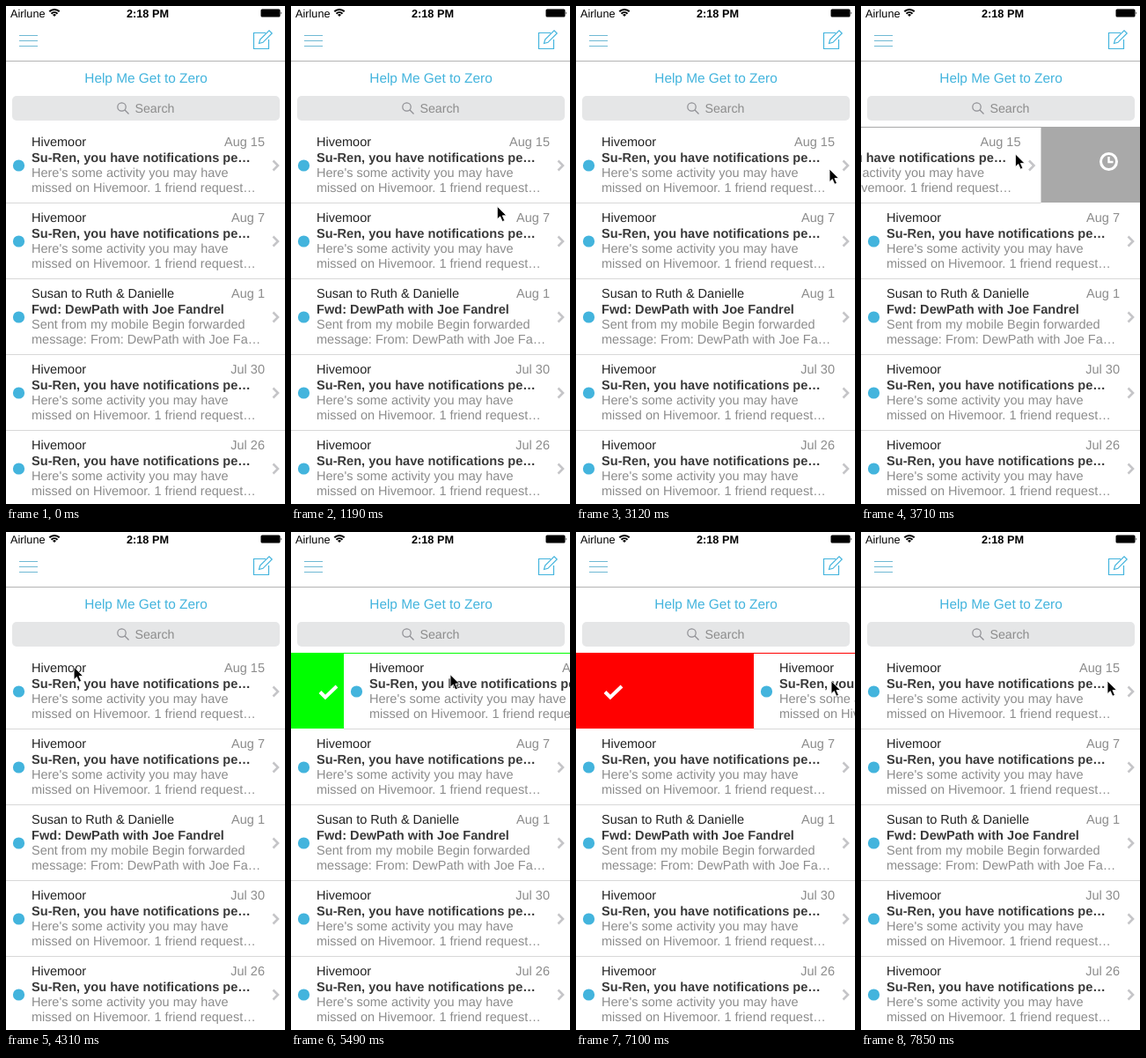
Write an HTML page that moves like this. It is 317 px wide and 565 px high and loops after 8000 ms.

```html
<!DOCTYPE html>
<html lang="en">
<head>
<meta charset="utf-8">
<title>Inbox swipe</title>
<style>
  html, body { margin: 0; width: 100%; height: 100%; overflow: hidden; background: #fff; }
  svg { display: block; width: 317px; height: 565px; }
  text { font: 14.5px "Liberation Sans", Arial, sans-serif; fill: #8c8c8c; text-rendering: geometricPrecision; }
  .status { font-size: 12.7px; fill: #000; }
  .strong { font-weight: bold; }
  .sender { fill: #222; }
  .subject { font-size: 14.6px; font-weight: bold; fill: #3a3a3a; }
  .blue { fill: #43b4dd; }
  .line { fill: none; }
</style>
</head>
<body>
<svg viewBox="0 0 317 565">
  <rect width="317" height="565" fill="#fff"/>

  <!-- status bar -->
  <text class="status" x="5" y="12.5">Airlune</text>
  <path class="line" d="M49.3 6.3a8 8 0 0 1 11.4 0M51.5 8.7a5 5 0 0 1 7 0" stroke="#000" stroke-width="2"/>
  <path d="M55 12l-2-2a3 3 0 0 1 4 0z"/>
  <text class="status strong" x="161" y="12.5" text-anchor="middle">2:18 PM</text>
  <rect x="289.5" y="3.5" width="22" height="9" rx="1.5"/>
  <path d="M312.5 6.2q1.6 1.8 0 3.6z"/>

  <!-- navigation -->
  <path class="line" d="M15 33.5h21M15 39.5h21M15 45.5h21" stroke="#6fb9d4"/>
  <g class="line" stroke="#43b4dd" stroke-width="1.2">
    <path d="M295 30.5H281.5V48.5H298.5V38"/>
    <path d="M287.5 42.5l1.2-4.4L299 27.8l3.2 3.2L291.9 41.3z"/>
  </g>
  <path d="M0 62.5h317" stroke="#b4b4b4"/>
  <text class="blue" x="159" y="87" text-anchor="middle" style="font-size:15.4px">Help Me Get to Zero</text>
  <rect x="7" y="102" width="304" height="28" rx="5" fill="#e5e6e7"/>
  <g class="line" stroke="#8e8e93" stroke-width="1.2">
    <circle cx="131.5" cy="114.5" r="4.7"/>
    <path d="M135 118l4.5 4.5"/>
  </g>
  <text x="146.5" y="121" style="font-size:14.2px">Search</text>

  <!-- swipe actions, uncovered by the first row -->
  <rect id="panel" y="137" width="317" height="86"/>
  <path id="check" class="line" d="M33 181.5l6 6L52 175" stroke="#fff" stroke-width="4"/>
  <g id="clock" class="line" stroke="#fff" stroke-width="3">
    <circle cx="281.5" cy="176.5" r="9"/>
    <path d="M281.5 171v6h5" stroke-width="2.4"/>
  </g>

  <g id="rows"></g>
  <path id="cursor" d="M0 0v14.5l3.3-3 2.5 5.7 2.6-1.1-2.5-5.6h4.6z" stroke="#fff" stroke-width=".8"/>
</svg>

<script>
const LOOP = 8000, START = 296, TICK = 147.9;
const ROW_TOP = 137, ROW_HEIGHT = 86, SPRING_TICKS = 2;
const byId = id => document.getElementById(id);

const activity = date => ({
  sender: 'Hivemoor', date, subject: 'Su-Ren, you have notifications pe…',
  body: ["Here's some activity you may have", 'missed on Hivemoor. 1 friend request…']
});
const messages = [
  activity('Aug 15'),
  activity('Aug 7'),
  {
    sender: 'Susan to Ruth &amp; Danielle', date: 'Aug 1', subject: 'Fwd: DewPath with Joe Fandrel',
    body: ['Sent from my mobile Begin forwarded', 'message: From: DewPath with Joe Fa…']
  },
  activity('Jul 30'),
  activity('Jul 26')
];

byId('rows').innerHTML = messages.map((m, i) => `
  <g transform="translate(0 ${ROW_TOP + i * ROW_HEIGHT})"><g class="content">
    <rect y="1" width="317" height="${ROW_HEIGHT - 1}" fill="#fff"/>
    <circle class="blue" cx="14.5" cy="44" r="6.6"/>
    <text class="sender" x="29" y="22">${m.sender}</text>
    <text x="294" y="22" text-anchor="end">${m.date}</text>
    <text class="subject" x="29" y="39.5">${m.subject}</text>
    <text x="29" y="56.5">${m.body[0]}</text>
    <text x="29" y="73.5">${m.body[1]}</text>
    <path class="line" d="M303.5 38.5l5.5 5.5-5.5 5.5" stroke="#c5c5c8" stroke-width="2.6"/>
    <path d="M0 86.5h317" stroke="#d8d8d8"/>
  </g></g>`).join('');
const swipedRow = document.querySelector('.content');

// Pointer strokes in ticks; the row follows from start to release, then springs back.
const strokes = [
  { start: 0, end: 1, release: 0, from: [305, 529], to: [195, 313] },
  { start: 7, end: 10, release: 12, from: [263, 165], to: [213, 168] },
  { start: 19, end: 26.5, release: 25, from: [288, 185], to: [77, 153] },
  { start: 30, end: 36, release: 36, from: [121, 160], to: [193, 162] },
  { start: 38, end: 42, release: 48, from: [89, 168], to: [291, 169] },
  { start: 51, end: 52, release: 51, from: [280, 169], to: [280, 169] }
];

const clamp = v => Math.min(1, Math.max(0, v));
const mix = (a, b, part) => a.map((v, i) => v + (b[i] - v) * part);
const along = (s, tick) => mix(s.from, s.to, clamp((tick - s.start) / (s.end - s.start)));

function poseAt(tick) {
  const index = strokes.findLastIndex(s => s.start <= tick);
  const stroke = strokes[index], next = strokes[index + 1] || stroke;
  const travel = clamp((tick - stroke.end) / (next.start - stroke.end)) ** 3;
  const pointer = tick < stroke.end ? along(stroke, tick) : mix(stroke.to, next.from, travel);
  const pulled = along(stroke, Math.min(tick, stroke.release))[0] - stroke.from[0];
  const spring = (1 - clamp((tick - stroke.release) / SPRING_TICKS)) ** 3;
  return { pointer, offset: pulled * spring };
}

const show = (id, visible) => byId(id).setAttribute('visibility', visible ? 'visible' : 'hidden');

function draw(time) {
  // the picture advances in even steps
  const tick = Math.floor((time - START) / TICK);
  const { pointer, offset } = poseAt(Math.max(tick, 0));
  show('cursor', tick >= 0);
  byId('cursor').setAttribute('transform', `translate(${pointer})`);
  swipedRow.setAttribute('transform', `translate(${offset} 0)`);
  byId('panel').setAttribute('fill', offset <= 0 ? '#a9a9a9' : offset < 150 ? '#0f0' : '#f00');
  show('panel', offset);
  show('check', offset > 0);
  show('clock', offset < 0);
}

const begin = performance.now();
function loop() {
  draw((performance.now() - begin) % LOOP);
  requestAnimationFrame(loop);
}
loop();
</script>
</body>
</html>
```
